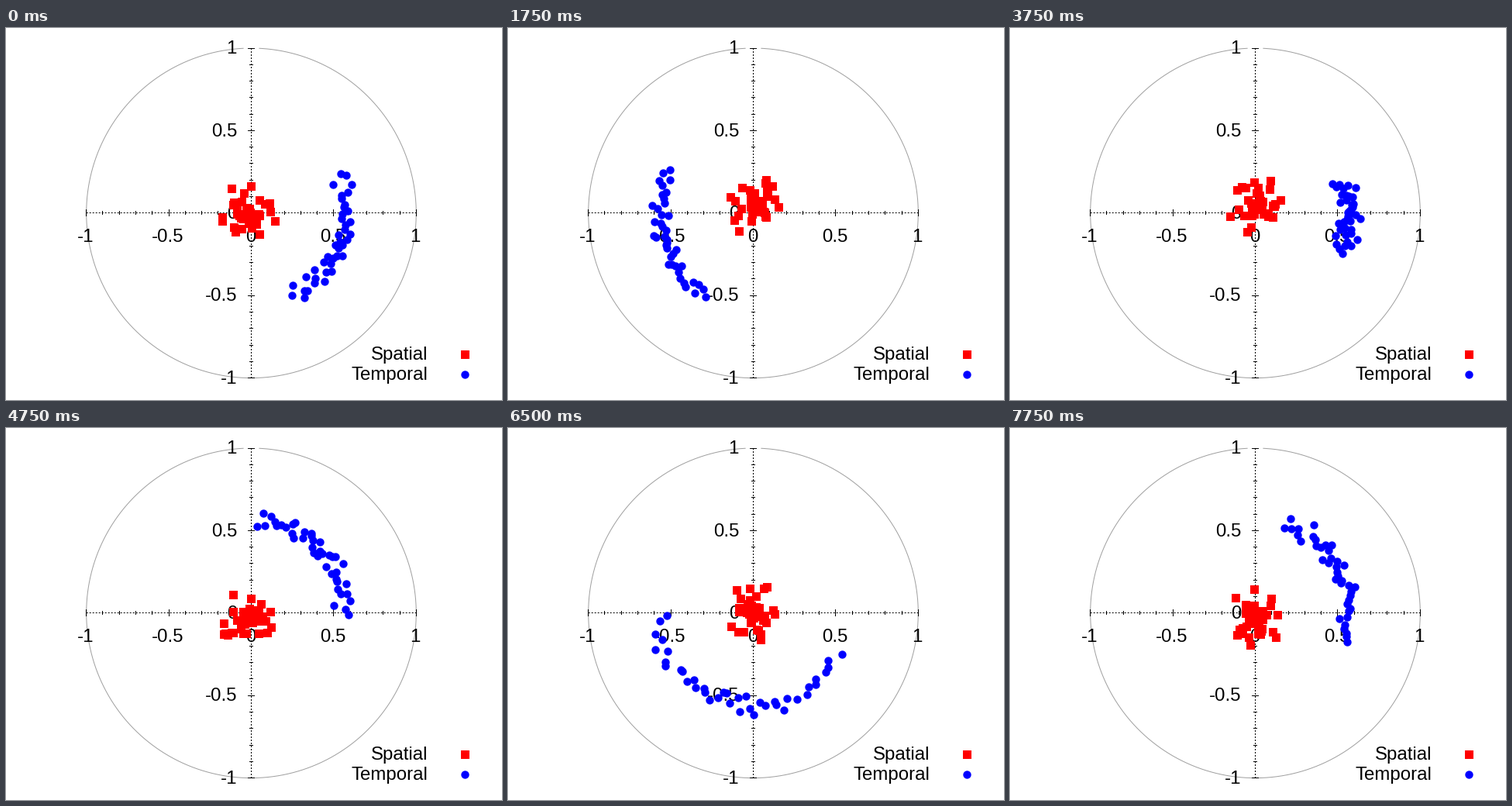
Write a matplotlib script that moves like this. It is 640 px wide and 480 px high and loops after 8 s.

```python
import matplotlib.pyplot as plt
import numpy as np
from matplotlib.animation import FuncAnimation
from matplotlib.collections import PolyCollection

W, H, DPI = 640, 480, 100
FRAMES, INTERVAL = 32, 250
CX, CY, UNIT = 316.5, 238.8, 212.8
PT = 72 / DPI  # points per pixel
COUNT = 40     # points in each group

plt.rcParams["font.family"] = "Liberation Sans"
fig = plt.figure(figsize=(W / DPI, H / DPI), dpi=DPI, facecolor="white")
ax = fig.add_axes([0, 0, 1, 1])
ax.set_xlim(0, W)
ax.set_ylim(H, 0)
ax.axis("off")


def mid(v):
    """Centre of the pixel that holds v."""
    return np.floor(v) + 0.5


def line(xs, ys, color="black", **style):
    ax.plot(xs, ys, color=color, lw=PT, snap=False, dash_capstyle="butt",
            solid_capstyle="projecting", **style)


def label(x, y, text, ha):
    ax.text(x, y, text, fontsize=24 * PT, ha=ha, va="baseline")


def draw_axes():
    # the outer circle is open around the top tick
    t = np.radians(np.linspace(92.8, 447.2, 400))
    line(CX + UNIT * np.cos(t), CY - UNIT * np.sin(t), "#a0a0a0")
    x0, y0 = mid(CX), mid(CY)
    dots = dict(linestyle=(0, (2, 2)))
    line([CX - UNIT, CX + UNIT], [y0, y0], **dots)
    line([x0, x0], [CY - UNIT, CY + UNIT], **dots)
    for i in range(-10, 11):
        size = 2 if i % 5 else 4
        dx, dy = CX + i * UNIT / 10, CY - i * UNIT / 10
        line([mid(dx)] * 2, [y0 - size, y0 + size])
        line([x0 - size, x0 + size], [mid(dy)] * 2)
        if i % 5 == 0:
            text = f"{i / 10:g}"
            label(dx - 1, 276, text, "center")
            label(298, dy + 7.2, text, "right")


def markers(shape, color, z):
    group = PolyCollection([], facecolors=color, linewidths=0, snap=False,
                           zorder=z)
    ax.add_collection(group, autolim=False)
    return lambda xy: group.set_verts(mid(xy)[:, None] + shape)


SQUARE = 5.5 * np.array([(-1, -1), (1, -1), (1, 1), (-1, 1)])
TURN = np.linspace(0, 2 * np.pi, 24, endpoint=False)
DISC = 5.2 * np.column_stack([np.cos(TURN), np.sin(TURN)])


def draw_legend():
    rows = (("Spatial", 421, SQUARE, "red"), ("Temporal", 447, DISC, "blue"))
    for text, y, shape, color in rows:
        label(544.5, y + 7, text, "right")
        markers(shape, color, 4)(np.array([(592, y)]))


# The blue arc swings round the circle: frame, centre and half width (degrees).
SWING = np.array([
    (0, -20, 45), (4, -37, 61), (5, -114, 48), (8, -188, 43), (10, -176, 34),
    (13, -88, 52), (15, -2, 23), (17, 5, 40), (20, 62, 47), (23, -96, 84),
    (29, -109, 72), (30, -64, 68), (31, 27, 46)])


def polar(r, t, x=CX, y=CY):
    return np.column_stack([x + r * np.cos(t), y - r * np.sin(t)])


def arc(frame, rng):
    centre, half = (np.interp(frame, SWING[:, 0], SWING[:, k]) for k in (1, 2))
    # evenly spread with some jitter, denser towards the middle
    e = 2 * (np.arange(COUNT) + rng.random(COUNT)) / COUNT - 1
    e *= 0.75 + 0.25 * np.abs(e)
    r = UNIT * np.clip(rng.normal(0.57, 0.033, COUNT), 0.49, 0.64)
    return polar(r, np.radians(centre + half * e))


def cloud(rng):
    # a packed core with a few loose points around it
    u = np.linspace(0, 1, COUNT)
    x, y = rng.normal((CX, CY), 4)
    return polar(4 + 34 * u ** 1.5, rng.uniform(0, 2 * np.pi, COUNT), x, y)


draw_axes()
draw_legend()
place_spatial = markers(SQUARE, "red", 5)
place_temporal = markers(DISC, "blue", 6)


def update(frame):
    rng = np.random.default_rng(100 + frame)
    place_spatial(cloud(rng))
    place_temporal(arc(frame, rng))
    return []


anim = FuncAnimation(fig, update, frames=FRAMES, interval=INTERVAL,
                     repeat=True, repeat_delay=0, blit=False)
plt.show()
```
